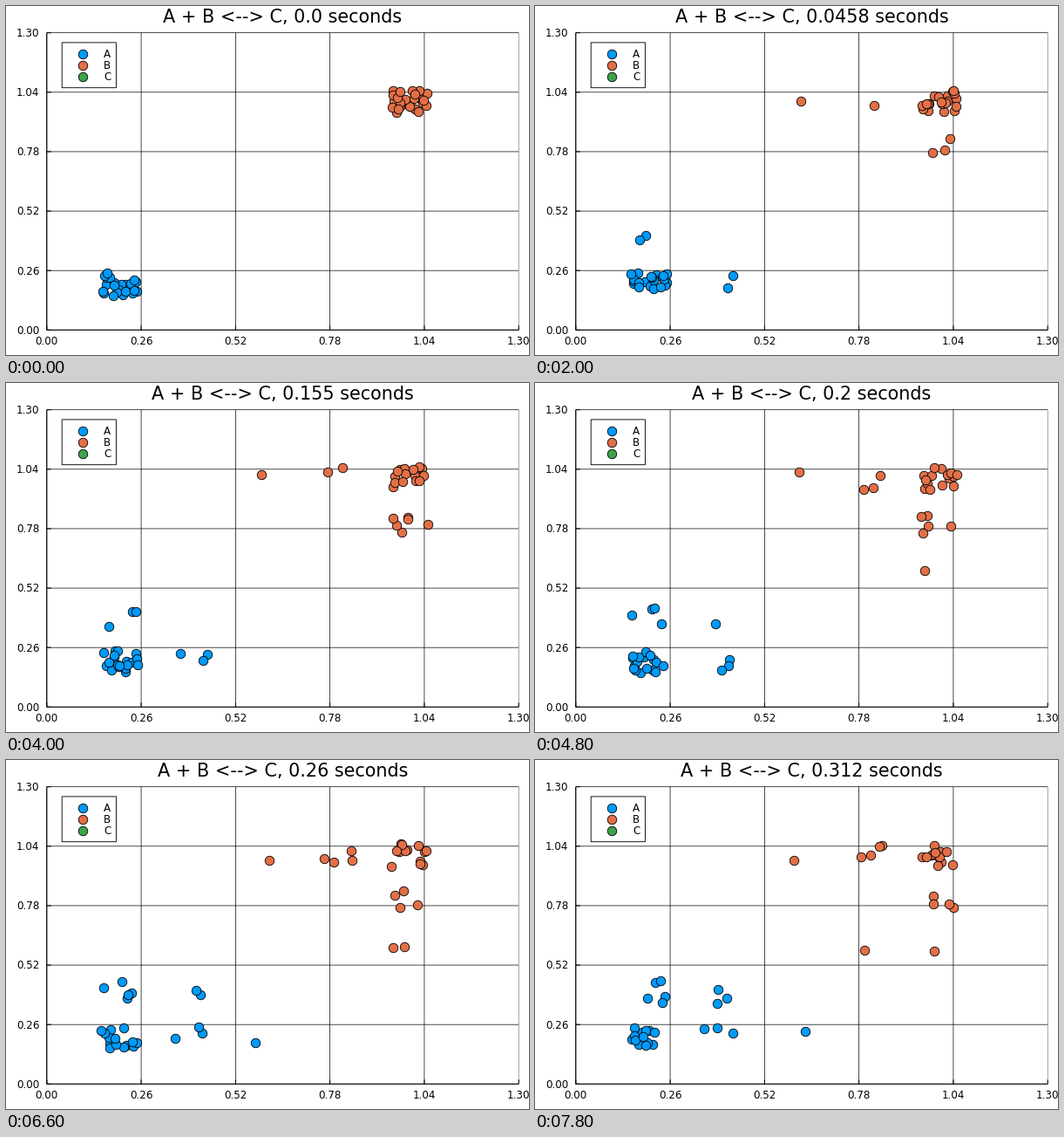
These frames come from a looping animation (600x400 px, 8000 ms). A matplotlib script:

```python
import numpy as np
import matplotlib.pyplot as plt
from matplotlib.animation import FuncAnimation
from matplotlib.patches import Rectangle

plt.rcParams["font.family"] = "DejaVu Sans"

W, H, DPI = 600, 400, 100
PX = 72 / DPI  # one pixel in points
STEPS, INTERVAL = 40, 200

# Plot area in stage pixels; both axes run from 0 to LIMIT.
LEFT, RIGHT, TOP, BOTTOM = 46.8, 588.2, 30.7, 371.3
LIMIT = 1.3
ORIGIN = np.array([LEFT, BOTTOM])
SCALE = np.array([RIGHT - LEFT, TOP - BOTTOM]) / LIMIT

# Particles hop between cells and land anywhere inside the core of a cell.
COUNT, CELL, SPREAD = 25, 0.2, 0.05
MOVES = {"U": (0, 1), "D": (0, -1), "L": (-1, 0), "R": (1, 0)}

BLUE, ORANGE, GREEN = "#009AFA", "#E36F47", "#3DA44D"

# Simulated time runs unevenly over the steps.
CLOCK_STEPS = [0, 5, 10, 16, 24, 33, 39]
CLOCK = [0, 0.021, 0.0458, 0.11, 0.2, 0.26, 0.312]


def leave(move, first, last, n):
    """Routes of n walkers that leave home at even intervals."""
    return [[(step, move)] for step in np.linspace(first, last, n)]


def hop_on(routes, moves, steps):
    """Give the first few walkers one more hop."""
    for route, move, step in zip(routes, moves, steps):
        route.append((step, move))


def routes_a():
    up, right = leave("U", 2, 28, 5), leave("R", 3, 39, 7)
    hop_on(right, "UURU", range(21, 40, 6))
    return up + right


def routes_b():
    down, left = leave("D", 3, 18, 6), leave("L", 3, 28, 5)
    hop_on(left, "L", [7])
    hop_on(down, "DD", [22, 30])
    hop_on(down, "L", [37])
    return down + left


def to_px(units):
    return ORIGIN + np.asarray(units) * SCALE


def positions(home, routes, seed, step):
    cells = np.full((COUNT, 2), home)
    for cell, route in zip(cells, routes):
        for when, move in route:
            if when <= step:
                cell += CELL * np.array(MOVES[move])
    rng = np.random.default_rng([seed, step])
    return to_px(cells + rng.uniform(-SPREAD, SPREAD, cells.shape))


def text(x, y, s, size=11.9, ha="center"):
    return ax.text(x, y, s, fontsize=size * PX, ha=ha, va="baseline", zorder=6)


def line(x0, y0, x1, y1, width, color="black"):
    ax.plot([x0, x1], [y0, y1], color=color, lw=width * PX, snap=False,
            solid_capstyle="butt", zorder=1)


def dots(points, color, z):
    x, y = np.transpose(points)
    return ax.scatter(x, y, s=(10.5 * PX) ** 2, c=color, edgecolors="black",
                      linewidths=0.85 * PX, zorder=z)


fig = plt.figure(figsize=(W / DPI, H / DPI), dpi=DPI, facecolor="white")
ax = fig.add_axes([0, 0, 1, 1])
ax.set(xlim=(0, W), ylim=(H, 0))
ax.set_autoscale_on(False)
ax.axis("off")

# Grid, ticks, labels and the two axis lines.
for value in np.linspace(0, LIMIT, 6):
    x, y = to_px((value, value))
    line(x, TOP, x, BOTTOM, 0.7, "#777777" if value == LIMIT else "black")
    line(LEFT, y, RIGHT, y, 0.7)
    line(x, BOTTOM, x, BOTTOM - 5, 1)
    line(LEFT, y, LEFT + 5, y, 1)
    text(x, 387.5, f"{value:.2f}")
    text(38.5, y + 4.4, f"{value:.2f}", ha="right")
line(LEFT, TOP, LEFT, BOTTOM, 1)
line(LEFT, BOTTOM, RIGHT, BOTTOM, 1)

ax.add_patch(Rectangle((64.2, 41.9), 62.2, 51.8, fc="white", ec="black",
                       lw=0.9 * PX, snap=False, zorder=4))
for i, (name, color) in enumerate(zip("ABC", (BLUE, ORANGE, GREEN))):
    y = 55 + 13 * i
    dots([(88.3, y)], color, 5)
    text(112, y + 4.2, name, ha="left")

title = text((LEFT + RIGHT) / 2, 18.6, "", size=20.8)
species = [(0.2, routes_a(), 11), (1.0, routes_b(), 29)]
clouds = [dots(positions(*kind, 0), color, z)
          for kind, color, z in zip(species, (BLUE, ORANGE), (2, 3))]


def draw(step):
    now = np.interp(step, CLOCK_STEPS, CLOCK)
    label = f"{now:.3g}" if step else "0.0"
    title.set_text(f"A + B <--> C, {label} seconds")
    for kind, cloud in zip(species, clouds):
        cloud.set_offsets(positions(*kind, step))
    return [title, *clouds]


anim = FuncAnimation(fig, draw, frames=STEPS, interval=INTERVAL,
                     init_func=lambda: draw(0), repeat=True, repeat_delay=0)
plt.show()
```
